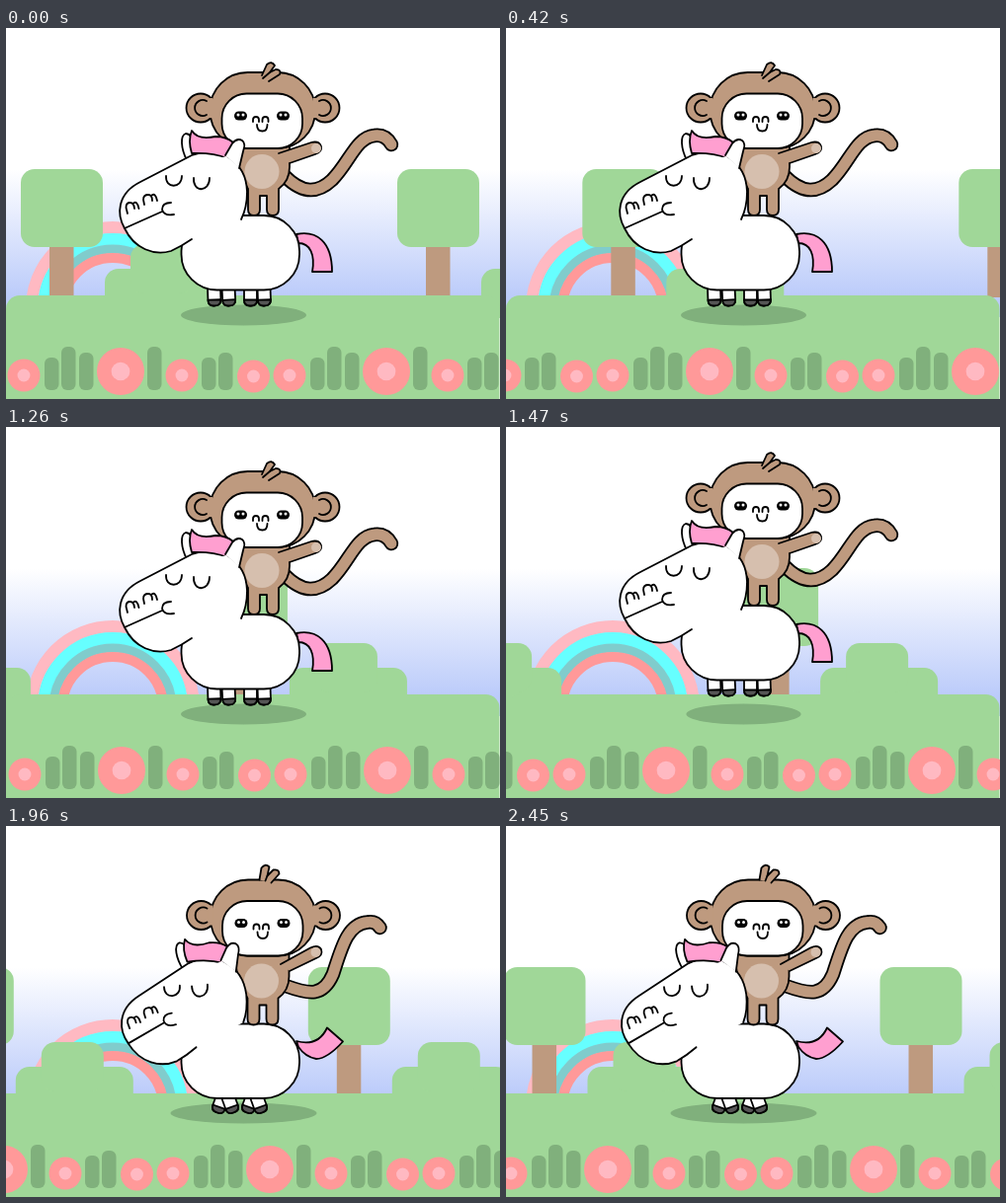
An HTML page for the animation above (2520 ms loop, 500 by 376 pixels).

```html
<!DOCTYPE html>
<html lang="en">
<head>
<meta charset="utf-8">
<title>Pony ride</title>
<style>
html, body { margin: 0; width: 100%; height: 100%; overflow: hidden; background: #fff; }
svg { display: block; width: 500px; height: 376px; }
.ink { stroke: #000; stroke-width: 1.8; stroke-linecap: round; stroke-linejoin: round; }
.line { fill: none; }
</style>
</head>
<body>
<svg id="stage" viewBox="0 0 500 376" xmlns="http://www.w3.org/2000/svg"></svg>
<script>
const GREEN = '#a0d798', DARK = '#80b07c', BROWN = '#be9a7f', SKIN = '#d6bfae', PINK = '#ff9fd0';
const STEP = 70, STEPS = 36, GAP = 381, PATCH = 269;

const rect = (x, y, w, h, r, fill, extra = '') =>
  `<rect x="${x}" y="${y}" width="${w}" height="${h}" rx="${r}" fill="${fill}" ${extra}/>`;
const circle = (x, y, r, fill, extra = '') =>
  `<circle cx="${x}" cy="${y}" r="${r}" fill="${fill}" ${extra}/>`;
const shape = (d, fill) => `<path class="ink" d="${d}" fill="${fill}"/>`;
const line = d => `<path class="ink line" d="${d}"/>`;
const fillOnly = (d, fill) => `<path d="${d}" fill="${fill}"/>`;
const group = (transform, body) => `<g transform="${transform}">${body}</g>`;
const stroke = (d, color, w) =>
  `<path d="${d}" fill="none" stroke="${color}" stroke-width="${w}" stroke-linecap="round"/>`;
const tube = (d, w) => stroke(d, '#000', w) + stroke(d, BROWN, w - 3.6);
const repeat = (count, gap, body) =>
  Array.from({ length: count }, (_, i) => group(`translate(${(i - 1) * gap})`, body)).join('');

// Scenery
const arc = (top, color, w) =>
  `<circle cx="108" cy="284" r="${284 - top - w / 2}" fill="none" stroke="${color}" stroke-width="${w}"/>`;
const rainbow = arc(196, '#ffb9c2', 12.5) + arc(208, '#66ffff', 12) + arc(219.5, '#80cccc', 9)
  + arc(228, '#ff9999', 10);

const tree = rect(44, 215, 24.5, 58, 0, BROWN) + rect(15, 143, 83, 79, 14, GREEN);
const bush = rect(100, 244, 119, 50, 14, GREEN) + rect(126, 219, 63, 50, 14, GREEN);

const flower = (x, y, r) => circle(x, y, r, '#ff9999') + circle(x, y, r * 0.39, '#ffb9c2');
const blade = (x, top) => rect(x, top, 14.5, 367 - top, 6, DARK);
const meadow = flower(116, 348, 24) + flower(178, 352, 16.5) + flower(250.5, 353, 16.5) + flower(287, 352, 16.5)
  + blade(143, 323) + blade(198, 334) + blade(215, 329)
  + blade(308, 334) + blade(325, 323) + blade(343, 329);

// Pony
function leg([x, angle], foot) {
  const hoof = foot - 6;
  return group(`rotate(${angle} ${x} ${foot - 19})`,
    shape(`M${x - 6.5} ${foot - 23} V${hoof} q0 6 6 6 h1 q6 0 6 -6 V${foot - 23}`, '#fff')
    + shape(`M${x - 6.5} ${hoof} q0 6 6 6 h1 q6 0 6 -6 Z`, '#555'));
}

const ponyBody = (y, legs, foot) => legs.map(l => leg(l, foot)).join('')
  + rect(177.5, y, 119.5, 75.5, 36, '#fff', 'class="ink"');

function ponyHead() {
  const face = 'M238 194 Q244 182 244 166 C243 134 215 119 188 129 L136 156 '
    + 'C112 168 112 189 120 203 C130 224 150 231 167 226 Q178 221 188 214';
  return shape('M183 134 C177 122 176 109 182 107 Q188 107 190 118 L196 132', '#fff')
    + fillOnly(face + ' Z', '#fff') + line(face)
    + shape('M188 104 C193 112 203 112 212 110 Q223 110 230 116 L224 132 Q209 126 188 127 Q184 114 188 104 Z', PINK)
    + shape('M222 129 L229 117 Q234 111 239 114 Q243 117 240 125 L236 142', '#fff')
    + fillOnly('M223 130 L235.500 141 L230 145 L216 132 Z', '#fff')
    + line('M162 150 C161 163 178 163 178 150')
    + line('M190 152 C189 167 206 167 206 152')
    + line('M120 203 L158 186 M167 177 Q158 177 158 184 Q160 191 170 189')
    + line('M123 188 l-1.5 -6 q0 -5 4 -5 q4 0 4.5 6 M128.500 178 q4 -4 6 5')
    + line('M140 179 l-1 -5 q0 -5 5 -5 q4 0 4 6 M147 170 q4 -4 6 5');
}

// Monkey
function monkeyBody() {
  return shape('M234 119 C231 138 239 152 245 163 V184 Q245 190 251 190 Q257 190 257 184 V170 '
      + 'H264 V184 Q264 190 270 190 Q276 190 276 184 V163 Q287 155 287 141 V119', BROWN)
    + circle(259, 145.500, 17.5, SKIN);
}

function monkeyHead(tuft, parting) {
  const eye = x => rect(x - 6.5, 84.5, 13, 9, 4.5, '#000')
    + circle(x - 2.5, 88, 1.5, '#fff') + circle(x + 2.5, 88, 1.5, '#fff');
  const nostril = x => line(`M${x} 95 v-2 q0 -3 3 -3 q3 0 3 3 v2`);
  return circle(197, 81, 14.5, BROWN, 'class="ink"') + circle(323, 81, 14.5, BROWN, 'class="ink"')
    + rect(206.5, 45, 106.5, 77, 38, BROWN, 'class="ink"')
    + rect(204, 71, 5, 20, 0, BROWN) + rect(310.5, 71, 5, 20, 0, BROWN)
    + line('M203 74 A8 8 0 1 0 203 88') + line('M317 74 A8 8 0 1 1 317 88')
    + rect(218.500, 66.500, 81.5, 55.5, 25, '#fff', 'class="ink"')
    + shape(tuft, BROWN) + line(parting)
    + eye(237.5) + eye(280.5) + nostril(250) + nostril(259.5)
    + line('M254 98 q0 6.500 5.500 6.500 q5 0 5 -6.500');
}

const leap =
  tube('M282 150 C300 168 315 168 330 154 C348 136 354 111 373 109 Q384 107.500 390 118', 14.5)
  + shape('M294 209 C314 205 330 216 330 247 L310 247 C313 230 308 218 296 218 Z', PINK)
  + ponyBody(190, [[210.5, -2], [225, -3], [247.5, 0], [261, -2]], 281.5)
  + monkeyBody()
  + shape('M276 127 L309 116 q8 -2 10 4 q1 6 -6 8 L287 137', BROWN) + circle(314, 122, 5, SKIN)
  + monkeyHead('M259 48 L264 37 Q269 33 272 38 L267 45 L273 42 Q279 42 277 47 L266 54', 'M267 45 L260 51')
  + ponyHead();

const land =
  tube('M283 162 C308 171 321 173 331 150 C340 122 346 99 366 97.500 Q374 96 378.500 103', 14.5)
  + shape('M294 218 Q316 224 325 204.500 L341 218.500 Q325 236 314 236 Q303 234 296 224 Z', PINK)
  + ponyBody(200.5, [[220, 20], [224, -20], [250, 20], [253, -20]], 291.5)
  + group('translate(-0.5 11.5)', monkeyBody())
  + shape('M278 140 L308 123.500 q8 -4 11 1.500 q2 6 -5 9 L287 147', BROWN) + circle(313.5, 128, 5, SKIN)
  + group('translate(0.5 9.5)',
    monkeyHead('M256 45 L258 33 Q262 28 266 32 L264 41 L270 35 Q276 34 276 39 L268 48', 'M264 41 L262 46'))
  + group('translate(-2 9.5) rotate(-6 198 152)', ponyHead());

const stage = document.getElementById('stage');
stage.innerHTML = `<defs><linearGradient id="sky" gradientUnits="userSpaceOnUse" x1="0" y1="143" x2="0" y2="273">
  <stop offset="0" stop-color="#fff"/><stop offset="1" stop-color="#bbcbfa"/></linearGradient>
  <clipPath id="horizon"><rect width="500" height="272"/></clipPath></defs>`
  + rect(0, 0, 500, 376, 0, '#fff') + rect(0, 143, 500, 150, 0, 'url(#sky)')
  + `<g clip-path="url(#horizon)">${rainbow}</g>`
  + `<g id="far">${repeat(3, GAP, tree + bush)}</g>`
  + `<rect id="ground" y="271" height="130" fill="${GREEN}"/>`
  + `<g id="near">${repeat(4, PATCH, meadow)}</g>`
  + `<ellipse id="shadow" cx="240.5" cy="291" ry="10.5" fill="${DARK}"/>`
  + `<g id="leap">${leap}</g><g id="land">${land}</g>`;

const el = id => document.getElementById(id);
const set = (id, attrs) => { for (const k in attrs) el(id).setAttribute(k, attrs[k]); };
const slide = (id, x) => set(id, { transform: `translate(${x})` });

// Hop cycle: rise above the take-off pose; the last two steps are on the ground
const RISE = [0, 13, 19, 9];

function draw(ms) {
  const n = Math.floor(ms / STEP) % STEPS, beat = n % 6;
  const grounded = beat >= RISE.length;
  const rise = grounded ? 0 : RISE[beat];
  slide('far', n * 10.386);
  slide('near', (n * 15) % PATCH - PATCH);
  set('ground', grounded ? { x: -15, width: 530, rx: 0 } : { x: 0, width: 499.5, rx: 14 });
  set('shadow', { rx: grounded ? 74 : 63.5 - rise * 0.6 });
  set('leap', { display: grounded ? 'none' : 'inline', transform: `translate(0 ${-rise})` });
  set('land', { display: grounded ? 'inline' : 'none' });
}

const start = performance.now();
function tick() {
  draw(performance.now() - start);
  requestAnimationFrame(tick);
}
draw(0);
requestAnimationFrame(tick);
</script>
</body>
</html>
```
